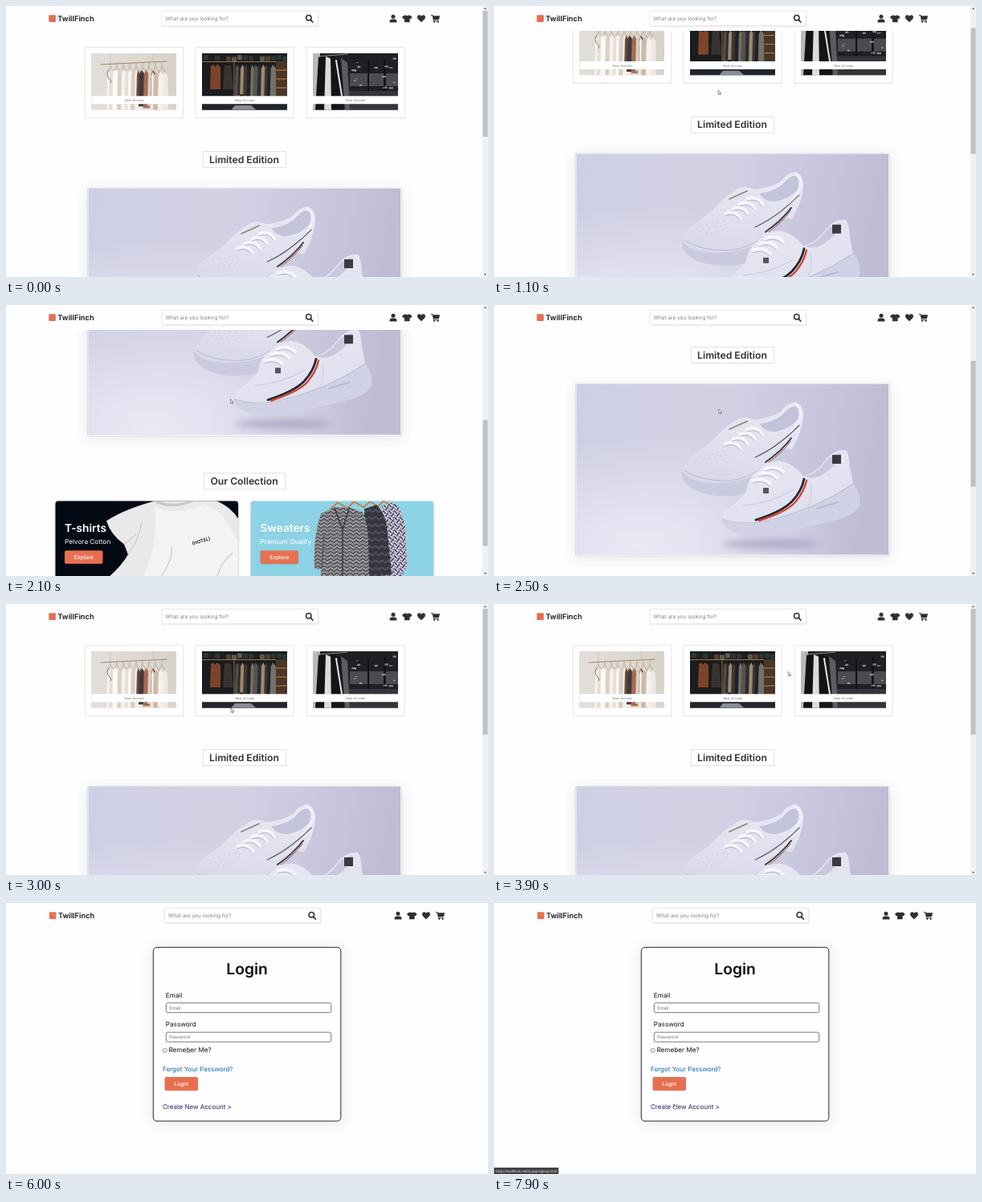
Write an HTML page that moves like this. It is 600 px wide and 338 px high and loops after 8 s.

```html
<!DOCTYPE html>
<html lang="en">
<head>
<meta charset="utf-8">
<title>TwillFinch</title>
<style>
html, body { margin: 0; width: 100%; height: 100%; overflow: hidden; background: #fefdff; }
svg { display: block; width: 100vw; height: 100vh; text-rendering: geometricPrecision; }
text { font-family: Inter, "Open Sans", sans-serif; }
</style>
</head>
<body>
<svg id="stage" viewBox="0 0 600 338" preserveAspectRatio="none"></svg>
<script>
const LOOP = 8000, STEP = 100;
const ORANGE = '#e76f51', INK = '#303033', PAPER = '#fefdff';
const HOST = 'twillfinch.netlify.app';

const rect = (x, y, w, h, fill, more = '') =>
  `<rect x="${x}" y="${y}" width="${w}" height="${h}" fill="${fill}" ${more}/>`;
const path = (d, fill, more = '') => `<path d="${d}" fill="${fill}" ${more}/>`;
const line = (d, color, width = 1, more = '') =>
  path(d, 'none', `stroke="${color}" stroke-width="${width}" stroke-linecap="round" ${more}`);
const text = (x, y, size, str, fill = '#111', weight = 400, more = '') =>
  `<text x="${x}" y="${y}" font-size="${size}" font-weight="${weight}" fill="${fill}" ${more}>${str}</text>`;
const mid = 'text-anchor="middle"';

function seeded(seed) {
  return () => (seed = (seed * 16807) % 2147483647) / 2147483647;
}

// A row of hanging garments with uneven hems
function garments(x, end, top, bottom, colors, seed) {
  const rnd = seeded(seed);
  let out = '';
  for (let i = 0; x < end; i++) {
    const w = 3 + rnd() * 3.5, hem = bottom - rnd() * 9;
    out += path(`M${x + w / 2} ${top}L${x + w + 1} ${top + 5}L${x + w + 2} ${hem}H${x - 1}L${x} ${top + 5}Z`,
      colors[i % colors.length]);
    x += w;
  }
  return out;
}

function paleRack() {
  const hangers = [...Array(9)].map((_, i) =>
    line(`M${130 + i * 8} 71v5l-4 7m4 -7l5 7`, '#b08d6c', .6)).join('');
  return rect(106, 59, 106, 71, 'url(#wall)') +
    line('M130 59V71M183 59V69', '#b9b1a8', .5) + hangers +
    path('M126 86L134 80L146 82L156 80L166 86L170 130H125Z', '#ece6de') +
    garments(126, 163, 80, 138, ['#f4f1ec', '#e6ded4', '#faf8f5', '#d9cfc4'], 11) +
    garments(163, 181, 80, 128, ['#6d4a3c', '#413a38', '#a56b4f', '#d8cfc6'], 5) +
    garments(181, 197, 82, 138, ['#efe9e2', '#cbb9a8', '#f5f1ec'], 9) +
    line('M118 73L200 69', '#a98561', 1) +
    line('M128 80q-4 5 0 10q4 3 2 6', '#55504c', .7);
}

function shelfRack() {
  const rnd = seeded(23);
  let folded = '';
  for (let x = 246; x < 348; x += 7)
    folded += rect(x, 61 + rnd() * 3, 6, 6, ['#2c3637', '#54402f', '#1c2023', '#5d5a52'][Math.floor(rnd() * 4)]);
  return rect(244, 59, 106, 71, '#1a1c1f') + folded + rect(244, 69, 106, 1, '#a27536') +
    garments(286, 332, 73, 117, ['#59534c', '#2b2e35', '#9b8a72', '#41362d', '#1f2329', '#777068'], 8) +
    path('M255 75L258 73L260 76L263 73L267 76V104H254Z', '#7d4428') +
    path('M272 74H280L283 104H270Z', '#37322e') +
    rect(283.5, 70, 1, 42, '#9a7038') +
    rect(336, 69, 14, 46, '#4b3726') + line('M337 80H349M337 91H349M337 102H349', '#b98a4b', 1) +
    rect(244, 121, 106, 9, '#22252c') + path('M285 124H305L312 130H280Z', '#8b8d95');
}

function darkRack() {
  const rnd = seeded(41);
  let lamps = '';
  for (let i = 0; i < 16; i++)
    lamps += rect(430 + rnd() * 55, 64 + rnd() * 38, 1 + rnd() * 5, 1 + rnd() * 1.5, '#d7d9de', 'opacity=".55"');
  return rect(382, 59, 106, 71, '#1f2024') + rect(428, 84, 60, 16, '#4b4c52') +
    rect(450, 68, 2, 42, '#101114') + rect(470, 66, 3, 45, '#141518') + lamps +
    rect(426, 106, 62, 24, '#34353b') +
    rect(382, 59, 9, 71, '#b9b9bc') +
    path('M389 64L398 62L402 100L398 130H385Z', '#131316') +
    path('M398 63L405 66L406 130H396Z', '#dcdcde') +
    path('M404 62L416 67L421 130H405Z', '#151518') +
    line('M411 68L418 112', '#e6e6e8', 2) +
    path('M417 65L425 71L428 130H422Z', '#5b5c61') +
    line('M388 63L425 60', '#8d8e92', 1);
}

function card(x, art) {
  return rect(x, 51.5, 122, 88, '#fff', 'stroke="#e6e5e8"') + art() +
    rect(x + 8, 112.3, 107, 9.9, '#fff') +
    text(x + 61, 118.9, 4, 'New Arrivals', '#777', 400, mid);
}

function title(x, y, w, str) {
  return rect(x + .5, y + .5, w, 20, '#fff', 'stroke="#dedde1" stroke-width=".9"') +
    text(x + w / 2, y + 14.6, 12.2, str, INK, 600, mid);
}

function shoes() {
  const back = 'M234 207Q236 194 252 184L272 169Q286 152 304 142Q314 138 324 143Q345 141 357 133Q364 123 375 121Q385 124 385 138Q384 158 371 180Q356 209 340 222Q318 239 288 238Q252 238 239 222Q233 215 234 207Z';
  const front = 'M283 267Q284 256 300 248L314 233Q315 217 329 206Q345 191 362 196Q373 199 386 214Q402 208 412 194Q424 179 438 181Q442 184 443 203L447 222Q457 236 455 250Q449 262 425 268Q370 283 322 288Q288 286 283 267Z';
  const laces = [0, 1, 2, 3].map(i =>
    line(`M${288 + i * 9} ${173 - i * 6}q12 -5 19 6`, '#f6f6fb', 3.6) +
    line(`M${288 + i * 9} ${176 - i * 6}q12 -5 18 5`, '#a9a9c2', .8)).join('');
  const dots = [...Array(14)].map((_, i) =>
    `<circle cx="${258 + (i % 5) * 7 + (i / 5 | 0) * 3}" cy="${188 + (i / 5 | 0) * 5 - (i % 5) * 1.5}" r=".6" fill="#b3b3c9"/>`).join('');
  return `<g transform="translate(0 129)">
    <ellipse cx="345" cy="298" rx="60" ry="6" fill="#9896b6" opacity=".6" filter="url(#blur)"/>
    <g>${path(back, 'url(#backShade)')}
    ${path('M234 207Q240 218 262 221Q300 225 324 212Q345 199 357 179L371 180Q356 209 340 222Q318 239 288 238Q252 238 239 222Q233 215 234 207Z', '#cbcbe0')}
    ${path('M359 137Q368 126 375 126Q382 130 378 143Q368 155 350 158Q335 158 331 148Q348 146 359 137Z', '#c3c3d9')}
    ${line('M238 207Q258 220 292 219Q318 217 334 202', '#b4b4cd', .9)}
    ${line('M325 190Q352 178 380 150', '#585868', 1.1)}${line('M338 196Q358 182 370 166', '#3b3a44', 2)}${line('M342 196Q359 184 369 170', '#b04a42', 1)}
    ${dots}${laces}${line('M293 155L315 145', '#8d8878', 1.8)}
    ${line('M374 123Q383 127 382 138Q378 152 367 160', '#f4f4fa', 1.6)}</g>
    <g>${path(front, 'url(#frontShade)')}
    ${path('M283 267Q300 275 330 272Q396 258 447 222Q457 236 455 250Q449 262 425 268Q370 283 322 288Q288 286 283 267Z', '#d2d2e6')}
    ${path('M388 214Q405 208 413 195Q423 184 432 185Q427 201 408 212Q396 218 388 214Z', '#c9c9de')}
    ${line('M284 267Q306 275 336 270Q398 256 446 224', '#b7b7cf', .9)}
    ${line('M326 268Q358 258 371 245Q383 232 386 217', '#26262c', 2.8)}${line('M330 269Q364 258 375 246Q386 233 389 219', '#cf4536', 2.4)}
    ${line('M322 219q13 -5 22 4M330 211q13 -5 22 4M338 204q13 -5 22 4', '#f7f7fc', 3.6)}
    ${line('M322 222q13 -5 21 4M330 214q13 -5 21 4M338 207q13 -5 21 4', '#ababc3', .8)}
    ${line('M310 250Q340 249 372 231', '#c3c3d8', .8)}${line('M394 222Q397 240 390 254', '#c6c6da', .8)}
    ${line('M402 254L428 246', '#b9b9d0', 2)}
    ${rect(421, 187, 11, 11, '#3a3a42')}${rect(335, 228, 7, 7, '#55555f')}</g></g>`;
}

function poster() {
  return rect(102, 228, 390, 214, '#fff', 'filter="url(#glow)"') +
    rect(101.5, 227.5, 390.5, 214.5, '#fff', 'stroke="#dedde4"') +
    rect(102.5, 228, 388.5, 212.5, 'url(#lilac)') +
    rect(102.5, 228, 388.5, 212.5, 'url(#light)') +
    `<g clip-path="url(#posterClip)">${shoes()}</g>`;
}

function bannerText(x, head, sub) {
  return text(x, 561.6, 13.7, head, '#fff', 600, 'filter="url(#soft)"') +
    text(x, 576.2, 8.2, sub, '#fff') +
    rect(x, 585, 47.5, 16.5, ORANGE, 'rx="1.8" filter="url(#soft)"') +
    text(x + 23.7, 595.6, 6.7, 'Explore', '#fff', 500, mid);
}

function banners() {
  const shirt = `<g clip-path="url(#left)">${rect(61, 523, 229, 99, '#040a14')}
    <g transform="translate(0 343)">
    ${path('M125 205Q148 190 186 180H262Q280 188 289 202V278H124Q142 264 152 247L147 234Q130 222 125 205Z', '#e9e9ec')}
    ${path('M182 180Q205 194 236 180H229Q207 187 190 180Z', '#c7c8cd')}
    ${path('M185 187Q212 200 246 184L268 196L289 230V278H168Q190 240 185 187Z', '#f3f3f5')}
    ${line('M152 247Q166 228 169 206M190 278Q208 255 206 238M262 278Q266 258 282 245M147 234Q156 228 162 221', '#c9cad0', 1.2)}
    ${text(243, 232, 5.8, '(HOTEL)', '#1b1b1e', 600, mid + ' transform="rotate(-16 243 230)"')}</g></g>`;
  const cardigan = 'M392 196L409 188H427L444 194Q450 205 451 230L452 278H392V266L384 264Q382 226 392 196Z';
  const coat = 'M446 190L461 185Q473 195 475 220L480 272L448 276Z';
  const bright = 'M468 186L482 182Q494 190 497 215L499 262L490 278H470Z';
  const knits = `<g clip-path="url(#right)">${rect(304, 523, 229, 99, '#8dd3e5')}
    <g transform="translate(0 343)">
    ${line('M404 190l9 -8l12 7M425 189l8 -8l12 7M445 188l8 -7l10 6M464 186l6 -6l9 6', '#c9763f', 1.8)}
    ${path(bright, '#d6dde5')}${path(bright, 'url(#flecks)')}
    ${path(coat, '#34353d')}${path(coat, 'url(#zigzag)', 'opacity=".5"')}
    ${path(cardigan, '#8d8d91')}${path(cardigan, 'url(#zigzag)')}
    ${line('M409 189L419 216L427 189M419 216V278', '#3d3d42', 1.6)}
    ${line('M396 222L393 264', '#48484d', 1)}</g></g>`;
  return rect(61.5, 523, 227.5, 98.5, '#fff', 'rx="4" filter="url(#drop)"') + shirt +
    rect(304.7, 523, 227.5, 98.5, '#fff', 'rx="4" filter="url(#drop)"') + knits +
    bannerText(73, 'T-shirts', 'Pelvora Cotton') + bannerText(316.5, 'Sweaters', 'Premium Quality');
}

function loginPage() {
  const field = (y, str) => rect(199.3, y, 205.5, 12, '#fff', 'rx="2.2" stroke="#6b6b70" stroke-width=".9"') +
    text(203.3, y + 8.1, 5.6, str, '#777');
  return rect(183.3, 55.3, 233.5, 216.7, '#fff', 'rx="4.5" filter="url(#glow)"') +
    rect(183.3, 55.3, 233.5, 216.7, PAPER, 'rx="4.5" stroke="#29292b"') +
    text(300, 88.8, 19.2, 'Login', '#0c0c0e', 600, mid) +
    text(198.8, 117.6, 8.2, 'Email') + field(124.7, 'Email') +
    text(198.8, 153.8, 8.2, 'Password') + field(161.2, 'Password') +
    rect(195.6, 181.8, 4.3, 4.3, '#fff', 'rx=".7" stroke="#666" stroke-width=".7"') +
    text(202.4, 186.3, 8.2, 'Remeber Me?') +
    text(195, 210, 8, 'Forgot Your Password?', '#1167b8') +
    rect(197.5, 217, 41.5, 17, ORANGE, 'id="submit" rx="2"') +
    text(218.2, 228, 6.7, 'Login', '#fff', 500, mid) +
    text(195, 257.2, 8, 'Create New Account &gt;', '#2b1d66');
}

const ICONS = [
  [482, '<circle cy="-2.4" r="2.5"/><path d="M-4.4 5V3.5Q-4.4 .8 -1.6 .8H1.6Q4.4 .8 4.4 3.5V5Z"/>'],
  [499.3, '<path d="M-2.6 -4.4Q0 -2.6 2.6 -4.4L6.2 -2.2L4.7 .8L3.3 .2V4.6H-3.3V.2L-4.7 .8L-6.2 -2.2Z"/>'],
  [517, '<path d="M0 4.7L-4.4 .3Q-5.8 -1.6 -4.4 -3.5Q-2 -5.4 0 -2.9Q2 -5.4 4.4 -3.5Q5.8 -1.6 4.4 .3Z"/>'],
  [534.7, '<path d="M-5.6 -4.6H-3.4L-3 -3.4H5.4L4.2 1.3H-2L-1.8 2.2H3.9V3.1H-2.6L-4.1 -3.6H-5.6Z"/><circle cx="-1.5" cy="4.2" r="1.1"/><circle cx="3" cy="4.2" r="1.1"/>']
];

const svg = document.getElementById('stage');
svg.innerHTML = `<defs>
  <filter id="soft" x="-20%" y="-30%" width="140%" height="170%"><feDropShadow dx=".3" dy=".7" stdDeviation=".7" flood-opacity=".15"/></filter>
  <filter id="drop" x="-10%" y="-10%" width="120%" height="125%"><feDropShadow dx="0" dy="1" stdDeviation="1.3" flood-opacity=".4"/></filter>
  <filter id="glow" x="-20%" y="-20%" width="140%" height="140%"><feDropShadow dx="0" dy="2" stdDeviation="8" flood-color="#555566" flood-opacity=".16"/></filter>
  <filter id="blur" x="-30%" y="-100%" width="160%" height="300%"><feGaussianBlur stdDeviation="4"/></filter>
  <linearGradient id="lilac" x2="1" y2=".1"><stop stop-color="#cfcfe4"/><stop offset=".45" stop-color="#d3d2e5"/><stop offset=".75" stop-color="#c9c7dd"/><stop offset="1" stop-color="#bfbcd4"/></linearGradient>
  <radialGradient id="light" cx=".2" cy=".95" r=".65"><stop stop-color="#f0f0fa" stop-opacity=".8"/><stop offset="1" stop-color="#f0f0fa" stop-opacity="0"/></radialGradient>
  <linearGradient id="backShade" x1=".6" y1="0" x2=".3" y2="1"><stop stop-color="#e9e9f4"/><stop offset="1" stop-color="#d6d6e8"/></linearGradient>
  <linearGradient id="frontShade" x2=".5" y2="1"><stop stop-color="#eaeaf5"/><stop offset="1" stop-color="#dddded"/></linearGradient>
  <linearGradient id="wall" x2="1"><stop stop-color="#e2dfda"/><stop offset="1" stop-color="#d8d2cb"/></linearGradient>
  <pattern id="zigzag" width="8" height="9" patternUnits="userSpaceOnUse">
    <path d="M0 3L4 0L8 3M0 7L4 4L8 7" fill="none" stroke="#3b3b40" stroke-width="1.3"/><path d="M0 5L4 2L8 5" fill="none" stroke="#d5d5d8" stroke-width=".8"/></pattern>
  <pattern id="flecks" width="7" height="8" patternUnits="userSpaceOnUse">
    <path d="M0 0L4 4M3 8L7 3" stroke="#26365f" stroke-width="1.6"/><path d="M5 0L7 2M0 5L2 7" stroke="#bd4b5b" stroke-width="1.3"/></pattern>
  <clipPath id="posterClip">${rect(102.5, 228, 388.5, 212.5, '#000')}</clipPath>
  <clipPath id="left">${rect(61.5, 523, 227.5, 98.5, '#000', 'rx="4"')}</clipPath>
  <clipPath id="right">${rect(304.7, 523, 227.5, 98.5, '#000', 'rx="4"')}</clipPath>
  <clipPath id="photos">${rect(0, 0, 600, 129.6, '#000')}${rect(0, 138, 600, 600, '#000')}</clipPath>
</defs>
${rect(0, 0, 600, 338, PAPER)}
<g id="home"><g id="scroll"><g clip-path="url(#photos)">
  ${card(98.5, paleRack)}${card(236, shelfRack)}${card(374, darkRack)}</g>
  ${line('M98.5 129V139.5H220.5V129M236 129V139.5H358V129M374 129V139.5H496V129', '#e6e5e8')}
  ${title(245, 181, 103, 'Limited Edition')}${poster()}
  ${title(246, 488, 101, 'Our Collection')}${banners()}
</g>${rect(0, 0, 600, 31, PAPER)}</g>
<g id="login">${loginPage()}</g>
<g id="brand">${rect(53.3, 11.3, 8.6, 8.6, ORANGE, 'rx="1"')}${text(64.3, 19, 9.3, 'TwillFinch', '#161618', 600)}</g>
<g id="search">${rect(193.8, 6.3, 194.5, 18.4, '#fff', 'rx="1.5" stroke="#e2e2e5" stroke-width=".8" filter="url(#soft)"')}
  ${text(198.6, 18.1, 6.5, 'What are you looking for?', '#808084')}
  <circle cx="376.8" cy="14.8" r="3.2" fill="none" stroke="${INK}" stroke-width="1.5"/>${line('M379.3 17.4L381.8 20', INK, 1.8)}</g>
<g id="icons">${ICONS.map(([x, art]) => `<g class="icon" transform="translate(${x} 15.6)">${art}</g>`).join('')}</g>
<g id="bar">${rect(593, 0, 7, 338, '#f1f1f1')}${rect(593.6, 6, 6, 157, '#c1c1c1', 'id="thumb"')}
  ${path('M595 4L596.6 2L598.2 4Z', '#555')}${path('M595 334L596.6 336L598.2 334Z', '#555')}</g>
<g id="status">${rect(0, 330, 95, 8, '#434345', 'id="bubble"')}<text id="note" x="2" y="335.9" font-size="4.1" fill="#eee" style="font-family:'Open Sans',sans-serif"></text></g>
<g id="cursor">${path('M0 0V5.4L1.3 4.2L2.1 6L2.9 5.6L2.1 3.9H3.8Z', '#fff', 'id="arrow" stroke="#333" stroke-width=".5"')}
  ${path('M-.6 0Q0 -.6 .6 0V2.3L3 2.9Q3.5 3.1 3.4 4L2.9 6H-.3L-2 3.7Q-1.8 2.9 -.6 3.6Z', '#fff', 'id="hand" stroke="#333" stroke-width=".5"')}</g>`;

const $ = id => document.getElementById(id);
const icons = [...svg.querySelectorAll('.icon')];
const show = (id, on) => $(id).setAttribute('visibility', on ? 'visible' : 'hidden');
const move = (id, x, y) => $(id).setAttribute('transform', `translate(${x} ${y})`);

const SCROLL = [[0, 0], [1000, 0], [1450, 343], [1900, 343], [2450, 129], [2700, 129], [3000, 0]];
const MOUSE = [[0, 300, 342], [500, 230, 240], [900, 279, 105], [1900, 279, 105], [2300, 280, 130],
  [3600, 280, 130], [4300, 499, 14], [4500, 485.5, 16.5], [5400, 485.5, 16.5], [5650, 530, 36],
  [6000, 225.5, 181], [6300, 228, 183], [6700, 394, 166], [7000, 250, 206], [7200, 222, 225],
  [7500, 222, 225], [7800, 224.5, 251]];
const LOGIN_AT = 5000;
const NOTES = [
  [4300, 4600, `https://${HOST}/login.html`],
  [4600, LOGIN_AT, `Transferring data from ${HOST}...`],
  [LOGIN_AT, 5500, `https://${HOST}/login.html`],
  [6900, 7400, `https://${HOST}/forgotpass.html`],
  [7700, LOOP, `https://${HOST}/signup.html`]
];

// Eased values of a keyed track at time t
function at(track, t) {
  const i = track.findIndex(k => k[0] > t);
  if (i < 0) return track[track.length - 1].slice(1);
  const a = track[i - 1], b = track[i];
  const u = (t - a[0]) / (b[0] - a[0]), e = u * u * (3 - 2 * u);
  return a.slice(1).map((v, n) => v + (b[n + 1] - v) * e);
}

function draw(t) {
  const onLogin = t >= LOGIN_AT;
  const [offset] = at(SCROLL, t);
  const [x, y] = at(MOUSE, t);
  const inside = (l, top, r, b) => x >= l && x <= r && y >= top && y <= b;

  show('home', !onLogin);
  show('login', onLogin);
  show('bar', !onLogin);
  move('scroll', 0, -offset);
  $('thumb').setAttribute('y', 6 + offset * .493);
  move('brand', onLogin ? .6 : 0, 0);
  move('search', onLogin ? 3.5 : 0, 0);
  const shift = onLogin ? 6 : 0;
  move('icons', shift, 0);

  let link = onLogin && (inside(195, 202, 284, 212) || inside(195, 249, 282, 259));
  icons.forEach((icon, i) => {
    const cx = ICONS[i][0] + shift, hot = inside(cx - 6, 10, cx + 6, 22);
    icon.setAttribute('fill', hot ? ORANGE : INK);
    link = link || hot;
  });
  const pressable = onLogin && inside(197, 217, 239, 234);
  $('submit').setAttribute('fill', pressable ? '#dc6447' : ORANGE);

  const note = NOTES.find(n => t >= n[0] && t < n[1]);
  show('status', note);
  if (note) {
    $('note').textContent = note[2];
    $('bubble').setAttribute('width', $('note').getComputedTextLength() + 4);
  }
  move('cursor', x, y);
  show('arrow', !link && !pressable);
  show('hand', link || pressable);
}

function tick(now) {
  draw(Math.floor((now % LOOP) / STEP) * STEP);
  requestAnimationFrame(tick);
}
draw(0);
requestAnimationFrame(tick);
</script>
</body>
</html>
```
